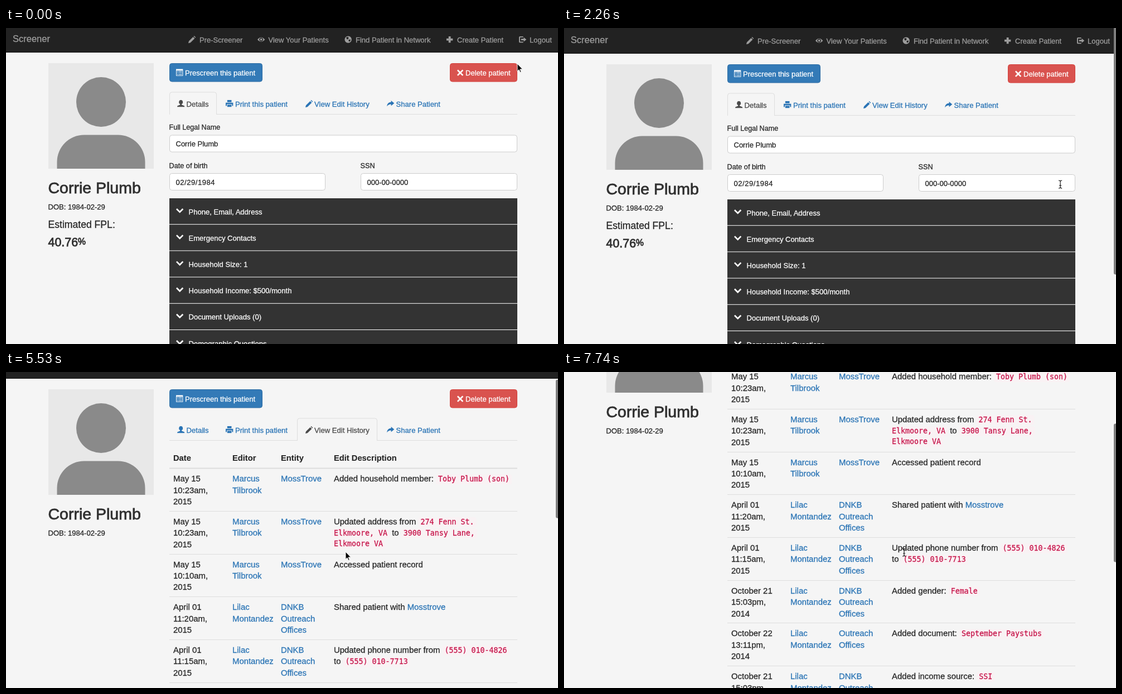
An HTML page for the animation above (8000 ms loop, 990 px wide and 566 px high).

```html
<!DOCTYPE html>
<html lang="en">
<head>
<meta charset="utf-8">
<title>Patient record</title>
<style>
html, body { margin: 0; width: 100%; height: 100%; overflow: hidden; background: #f5f5f5; }
svg { display: block; }
text { --ink: #262626; font-family: "Liberation Sans", Arial, sans-serif; white-space: pre; stroke-width: .28; }
text, tspan { fill: var(--ink); stroke: var(--ink); }
path[class] { fill: var(--ink); }
.mono { --ink: #c7144a; font: 13.3px "DejaVu Sans Mono", monospace; }
.link { --ink: #2a74b5; }
.nav { --ink: #9d9d9d; }
.on { --ink: #4a4a4a; }
.white { --ink: #fff; }
.medium { --ink: #303030; stroke-width: .8; }
.bold { font-weight: bold; stroke-width: .1; }
</style>
</head>
<body>
<svg id="stage" width="990" height="566" viewBox="0 0 990 566"></svg>
<script>
const icons = {
  pencil: 'M0 14l1-4 8-8 3 3-8 8zM10 1l1-1 3 3-1 1z',
  eye: 'M0 7Q7-1 14 7Q7 15 0 7zM7 3.4a3.6 3.6 0 1 0 .01 0zM7 5a2 2 0 1 0 .01 0z',
  globe: 'M7 .5a6.5 6.5 0 1 0 .01 0zM3 3l4-1 1 3-3 2zM8 7h4l-2 4-2-1z',
  plus: 'M5 1h4v4h4v4H9v4H5V9H1V5h4z',
  logout: 'M8 1H2Q0 1 0 3v8q0 2 2 2h6v-2H2V3h6zM9 3l5 4-5 4V8.5H4v-3h5z',
  user: 'M7 0a3.5 4 0 0 1 1.5 7.7V9l5 2q.5 1 .5 2H0q0-1 .5-2l5-2V7.7A3.5 4 0 0 1 7 0z',
  print: 'M3 0h8v4H3zM0 5h14v6h-2V8H2v3H0zM3 9h8v4H3z',
  share: 'M8 1l6 5-6 5V8Q3 8 0 12Q1 4 8 4z',
  list: 'M0 0h13v13H0zM1 3v9h11V3zM2 4h2v1H2zM5 4h6v1H5zM2 7h2v1H2zM5 7h6v1H5zM2 10h2v1H2zM5 10h6v1H5z',
  remove: 'M3 1l4 4 4-4 2 2-4 4 4 4-2 2-4-4-4 4-2-2 4-4-4-4z',
  chevron: 'M2 0l5 5 5-5 2 2-7 7-7-7z'
};
const cursors = {
  arrow: '<path d="M0 0V13.5l3-2.8 2.2 4.8 2-1-2.2-4.6H9.5z" stroke="#fff"/>',
  beam: '<path d="M-2 -6q3 0 3 2q0-2 3-2M1-4V6M-2 8q3 0 3-2q0 2 3 2M-1 3h4" fill="none" stroke="#222" stroke-width="1.2"/>',
  hand: '<path d="M0 0q2 0 2 2v4q5 0 7 3 0 5-2 8H-1q-1-3-4-7q1-2 3 0V2q0-2 2-2z" fill="#fff" stroke="#000"/><path d="M1 10v4M3 10v4M5 10v4" stroke="#000"/>'
};

const text = (x, y, str, size = 13, cls = '') =>
  `<text x="${x}" y="${y}" font-size="${size}" class="${cls}">${str}</text>`;
const box = (x, y, w, h, fill, more = '') =>
  `<rect x="${x}" y="${y}" width="${w}" height="${h}" fill="${fill}" ${more}/>`;
const icon = (name, x, y, cls) =>
  `<path d="${icons[name]}" transform="translate(${x} ${y}) scale(.95)" fill-rule="evenodd" class="${cls}"/>`;

const field = (x, y, w, str, more = '') =>
  box(x + .5, y + .5, w - 1, 30, '#fff', 'rx="4" stroke="#ccc"') +
  `<g ${more}>${text(x + 11.5, y + 20.5, str)}</g>`;
const button = (x, w, fill, edge, name, label) =>
  box(x + .5, 63.5, w - 1, 32.5, fill, `rx="4" stroke="${edge}"`) +
  icon(name, x + 12, 73.5, 'white') + text(x + 28, 85, label, 13.05, 'white');

// label, icon, icon x, text x, tab x, tab width
const tabList = [
  ['Details', 'user', 307, 323.5, 293, 85],
  ['Print this patient', 'print', 394, 411, 380, 140],
  ['View Edit History', 'pencil', 537, 553, 522, 144],
  ['Share Patient', 'share', 683, 699.5, 668, 124]
];
const tabs = active => box(293, 154, 624, 1, '#ddd') + tabList.map(([label, name, ix, tx, x, w], i) => {
  const cls = i === active ? 'on' : 'link';
  const shape = `<path d="M${x + .5} 155V119q0-4 4-4h${w - 9}q4 0 4 4V155" `;
  return (i === active ? shape + 'fill="#f5f5f5" stroke="#ddd"/>' : '') +
    (i === 2 && i !== active ? shape.replaceAll('155', '154') + 'id="hover" fill="#eee"/>' : '') +
    icon(name, ix, 129, cls) + text(tx, 140.5, label, 13.1, cls);
}).join('');

const patient = 'Corrie Plumb';
const navItems = [
  ['Pre-Screener', 'pencil', 327, 347], ['View Your Patients', 'eye', 451, 470.5],
  ['Find Patient in Network', 'globe', 607, 627], ['Create Patient', 'plus', 789, 809],
  ['Logout', 'logout', 920, 939]
];
const shared = box(0, -20, 990, 64, '#222') + box(0, 43, 990, 1, '#111') +
  text(12, 25, 'Screener', 16.5, 'nav') +
  navItems.map(([label, name, ix, tx]) => icon(name, ix, 14, 'nav') + text(tx, 26, label, 13, 'nav')).join('') +
  box(76, 63, 189, 189, '#e8e8e8') +
  '<g fill="#8a8a8a"><circle cx="170.5" cy="132.5" r="44.5"/>' +
  '<path d="M91.5 252V240A48.5 48.5 0 0 1 140 191.5H201A48.5 48.5 0 0 1 249.5 240V252z"/></g>' +
  text(75.5, 296, patient, 28.5, 'medium') + text(75.5, 324.5, 'DOB: 1984-02-29', 13.05) +
  button(293, 167, '#337ab7', '#2e6da4', 'list', 'Prescreen this patient') +
  button(796, 121, '#d9534f', '#d43f3a', 'remove', 'Delete patient');

const sections = ['Phone, Email, Address', 'Emergency Contacts', 'Household Size: 1',
  'Household Income: $500/month', 'Document Uploads (0)', 'Demographic Questions', 'Employment Information'];
const details = tabs(0) +
  text(75.5, 358, 'Estimated FPL:', 17.6) + text(75.5, 391, '40.76', 21.4, 'medium') + text(129, 388, '%', 15.7, 'medium') +
  text(292.5, 182, 'Full Legal Name', 12.6) + field(293, 191.5, 624, patient) +
  text(292.5, 250.5, 'Date of birth', 12.7) + field(293, 260, 280, '02/29/1984', 'letter-spacing=".55"') +
  text(635.5, 250.5, 'SSN', 12.7) + field(636, 260, 281, '000-00-0000') +
  box(293, 305, 624, 331, '#fff') +
  sections.map((label, i) => {
    const y = 305 + 47.2 * i;
    return box(293, y, 624, 46.2, '#333') + icon('chevron', 305, y + 18, 'white') +
      text(327.5, y + 28.6, label, 13.05, 'white');
  }).join('');

// `code` and [link] marks inside a line
const rich = line => line.split(/(`.*?`|\[.*?\])/).filter(Boolean).map((part, i, all) => {
  const body = part.slice(1, -1);
  if (part[0] === '`') return `<tspan class="mono" dx="${i ? 4 : 0}">${body}</tspan>`;
  if (part[0] === '[') return `<tspan class="link">${body}</tspan>`;
  return `<tspan dx="${i && all[i - 1][0] === '`' ? 4 : 0}">${part}</tspan>`;
}).join('');
// a line of code alone sits a little higher
const cell = (x, y, str, cls) => str.split('|').map((line, i) =>
  text(x, y + 20.4 * i - (/^`[^`]*`$/.test(line) ? 1.4 : 0), rich(line), 14.9, cls)).join('');

const marcus = 'Marcus|Tilbrook', lilac = 'Lilac|Montandez', moss = 'MossTrove', offices = 'DNKB|Outreach|Offices';
const edits = [
  ['May 15|10:23am,|2015', marcus, moss, 'Added household member: `Toby Plumb (son)`'],
  ['May 15|10:23am,|2015', marcus, moss, 'Updated address from `274 Fenn St.`|`Elkmoore, VA` to `3900 Tansy Lane,`|`Elkmoore VA`'],
  ['May 15|10:10am,|2015', marcus, moss, 'Accessed patient record'],
  ['April 01|11:20am,|2015', lilac, offices, 'Shared patient with [Mosstrove]'],
  ['April 01|11:15am,|2015', lilac, offices, 'Updated phone number from `(555) 010-4826`|to `(555) 010-7713`'],
  ['October 21|15:03pm,|2014', lilac, offices, 'Added gender: `Female`'],
  ['October 22|13:11pm,|2014', lilac, 'Outreach|Offices', 'Added document: `September Paystubs`'],
  ['October 21|15:03pm,|2014', lilac, offices, 'Added income source: `SSI`']
];
const columns = [300, 406, 493, 588];
const history = tabs(2) +
  ['Date', 'Editor', 'Entity', 'Edit Description'].map((h, i) => text(columns[i], 191, h, 14.7, 'bold')).join('') +
  box(293, 203.5, 624, 2, '#ddd') +
  edits.map((row, i) => {
    const y = 204.6 + 76.7 * i;
    return (i ? box(293, Math.floor(y), 624, 1, '#ddd') : '') +
      row.map((str, c) => cell(columns[c], y + 23.6, str, c === 1 || c === 2 ? 'link' : '')).join('');
  }).join('');

const $ = id => document.getElementById(id);
$('stage').innerHTML = box(0, 0, 990, 566, '#f5f5f5') +
  `<g id="page">${shared}<g id="details">${details}</g><g id="history">${history}</g></g>` +
  box(986, 0, 8, 443, '#7d7d7d', 'id="bar" rx="3"') +
  '<g id="status"><path d="M-1 567V552.5H326q4 0 4 4V567" fill="#dedede" stroke="#bbb"/>' +
  text(2, 564.5, 'localhost:5000/patient_history/16', 11.1) + '</g>' +
  Object.entries(cursors).map(([id, shape]) => `<g id="${id}">${shape}</g>`).join('');

// tinted plates behind code
document.querySelectorAll('.mono').forEach(el => {
  const p = el.getStartPositionOfChar(0), plate = document.createElementNS(el.namespaceURI, 'rect');
  const put = { x: p.x - 4, y: p.y - 13, width: el.getComputedTextLength() + 8, height: 18, rx: 4, fill: '#f9f2f4' };
  for (const k in put) plate.setAttribute(k, put[k]);
  el.parentNode.before(plate);
});

// bursts of motion: start, end, number of updates
const bursts = [[150, 300, 2], [900, 1340, 4], [1940, 2860, 7], [3450, 3750, 3],
  [4490, 4940, 4], [5240, 6180, 7], [6780, 7740, 7]];
const pointer = [[0, 917, 64], [300, 963, 292], [2093, 963, 292], [2247, 889, 279], [2707, 590, 134],
  [2860, 588, 132], [4340, 588, 132], [4490, 563, 190], [4640, 629, 270], [4940, 609, 322], [8000, 609, 322]];

const clamp = v => Math.max(0, Math.min(1, v));
const ease = (t, a, b) => { const p = clamp((t - a) / (b - a)); return p * p * (3 - 2 * p); };
const show = (id, opacity) => $(id).setAttribute('opacity', +opacity);

function tick(t) {
  let now = 0;
  for (const [a, b, n] of bursts) {
    const gap = (b - a) / (n - 1);
    if (t >= a) now = a + Math.min(n - 1, Math.floor((t - a + 25) / gap)) * gap;
  }
  return now;
}

function pointerAt(t) {
  const i = pointer.findIndex(k => k[0] > t);
  const [a, x, y] = pointer[i - 1], [b, x2, y2] = pointer[i];
  const p = (t - a) / (b - a);
  return [x + (x2 - x) * p, y + (y2 - y) * p];
}

function draw(time) {
  const t = tick(time % 8000), second = t >= 3450;
  const scroll = Math.round(second
    ? 128 * ease(t, 5247, 6180) + 87 * ease(t, 6700, 7740)
    : 68.4 * ease(t, 780, 1340) - 70.4 * ease(t, 1850, 2246) + 2 * ease(t, 2400, 2860));
  $('page').setAttribute('transform', `translate(0 ${-scroll})`);
  show('details', !second);
  show('history', second);
  show('hover', t > 2700);
  show('status', t > 2700 ? clamp(1 - (t - 3450) / 300) : 0);

  show('bar', second ? t >= 5240 : t >= 900 ? clamp((2800 - t) / 400) : 0);
  $('bar').setAttribute('y', scroll * (second ? .43 : .745));
  $('bar').setAttribute('height', second ? 248 : 443);

  const kind = t > 2700 && t < 3550 ? 'hand' : t > 5800 || (t > 2200 && t < 2300) ? 'beam' : 'arrow';
  for (const id in cursors) show(id, id === kind);
  $(kind).setAttribute('transform', `translate(${pointerAt(t)})`);
}

const start = performance.now();
(function loop() {
  draw(performance.now() - start);
  requestAnimationFrame(loop);
})();
</script>
</body>
</html>
```
